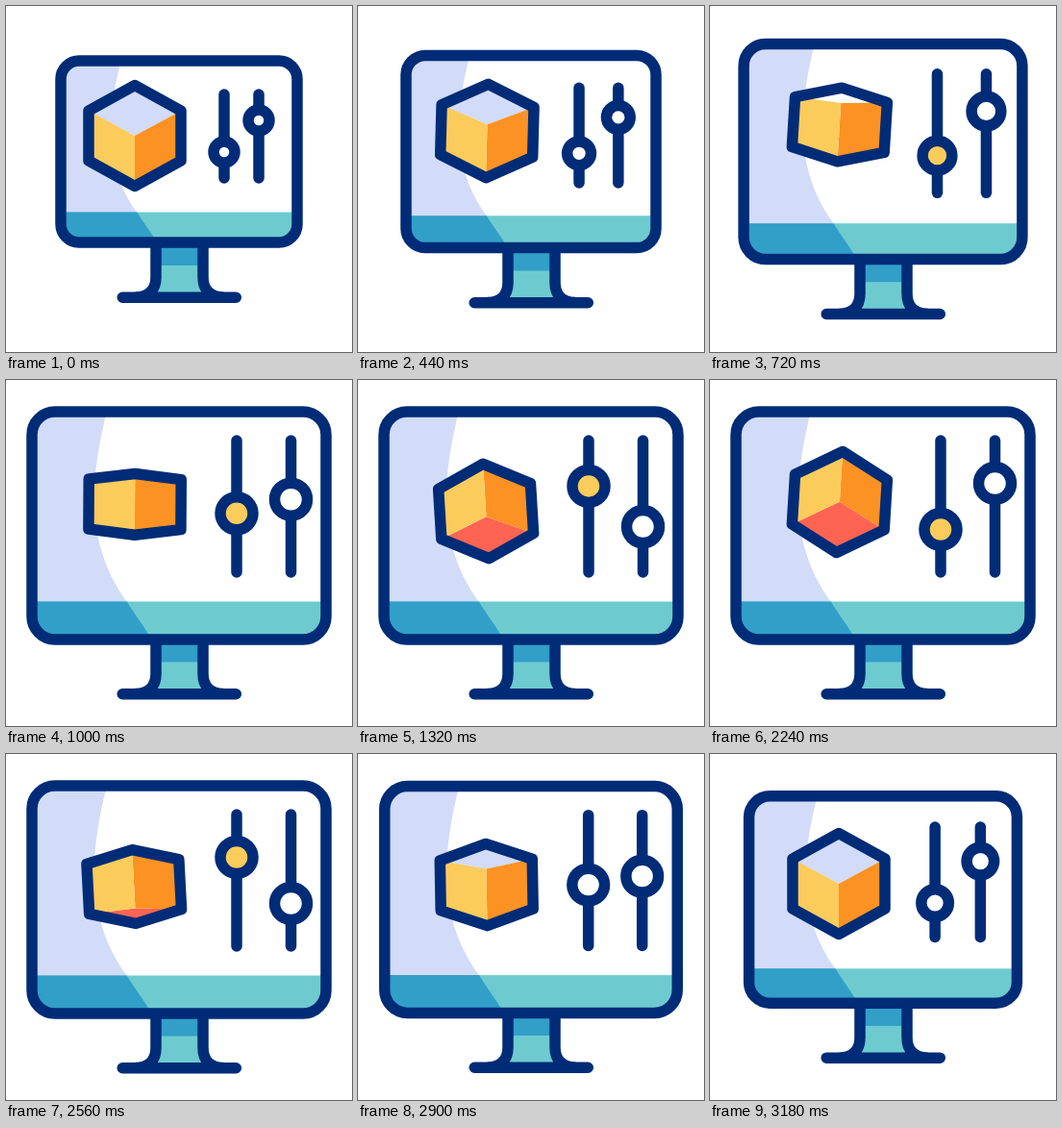
Write an HTML page with a canvas that moves like this. It is 360 by 360 pixels and loops after 3.2 s.

```html
<!DOCTYPE html>
<html lang="en">
<head>
<meta charset="utf-8">
<title>Monitor with cube and sliders</title>
<style>
  html, body { margin: 0; width: 100%; height: 100%; overflow: hidden; background: #fff; }
  canvas { display: block; width: 360px; height: 360px; }
</style>
</head>
<body>
<canvas id="stage"></canvas>
<script>
const LOOP = 3200, STEP = 20, SIZE = 360, LINE = 11.5;
const NAVY = '#002c77', TEAL = '#6dcbd0', BLUE = '#329fc9', LILAC = '#d2dbf8',
      YELLOW = '#fbcb5b', ORANGE = '#fc9223', RED = '#ff6452', WHITE = '#fff';

// Each track is a list of [time, value].
const tracks = {
  grow: [[205, 0], [600, .5], [720, .73], [990, 1], [2840, 1], [3220, .49], [3600, 0]],
  tilt: [[205, 33.5], [720, 15], [1320, -29], [1760, -35], [2160, -35], [2560, -15], [3120, 33.5]],
  roll: [[205, 0], [720, 3.5], [1320, -3.5], [1760, 0], [1800, 0], [2240, 3.5], [2560, -3], [3120, 0]],
  lift: [[205, 135], [720, 123.5], [1320, 136.5], [1760, 125.5], [2240, 127], [2560, 138], [3120, 135]],
  slide: [[680, 1], [1470, -1], [1475, -1], [2190, 1], [2610, -1], [3130, 1]]
};

const canvas = document.getElementById('stage');
const ctx = canvas.getContext('2d');
const ratio = window.devicePixelRatio || 1;
canvas.width = canvas.height = SIZE * ratio;

const mix = (a, b, p) => a + (b - a) * p;

// Slope at a key: flat at ends and turning points, harmonic mean elsewhere.
function slope(keys, i) {
  if (i === 0 || i === keys.length - 1) return 0;
  const [a, b, c] = [keys[i - 1], keys[i], keys[i + 1]];
  const before = (b[1] - a[1]) / (b[0] - a[0]);
  const after = (c[1] - b[1]) / (c[0] - b[0]);
  return before * after > 0 ? 2 * before * after / (before + after) : 0;
}

// Smooth interpolation that never overshoots its keys.
function valueAt(keys, t) {
  if (t <= keys[0][0]) return keys[0][1];
  const next = keys.findIndex(k => k[0] > t);
  if (next < 0) return keys[keys.length - 1][1];
  const [t0, v0] = keys[next - 1], [t1, v1] = keys[next];
  const span = t1 - t0, u = (t - t0) / span, u2 = u * u, u3 = u2 * u;
  return mix(v0, v1, 3 * u2 - 2 * u3)
    + span * slope(keys, next - 1) * (u3 - 2 * u2 + u)
    + span * slope(keys, next) * (u3 - u2);
}

function stroke(path) {
  ctx.strokeStyle = NAVY;
  ctx.lineWidth = LINE;
  ctx.lineCap = ctx.lineJoin = 'round';
  if (path) ctx.stroke(path);
  else ctx.stroke();
}

function polygon(points) {
  ctx.beginPath();
  points.forEach(([x, y]) => ctx.lineTo(x, y));
  ctx.closePath();
}

function face(color, ...points) {
  polygon(points);
  ctx.fillStyle = color;
  ctx.fill();
}

function rect(color, x, y, w, h) {
  ctx.fillStyle = color;
  ctx.fillRect(x, y, w, h);
}

const neck = new Path2D('M156 246V282C156 296 148 303 135 303H226C213 303 205 296 205 282V246Z');
const foot = new Path2D('M156 246V282C156 296 148 303 135 303M205 246V282C205 296 213 303 226 303M121.2 303.3H239.3');

function drawStand(grow) {
  ctx.save();
  ctx.translate(0, 23.5 * grow);
  ctx.fillStyle = TEAL;
  ctx.fill(neck);
  rect(BLUE, 156, 246, 49, 24);
  stroke(foot);
  ctx.restore();
}

function screenPath(grow) {
  const w = 123 + 30 * grow, h = 94.5 + 24 * grow;
  ctx.beginPath();
  ctx.roundRect(180 - w, 151.5 - h, 2 * w, 2 * h, mix(19, 24, grow));
}

const glare = new Path2D('M20 25H107C87 100 81 170 126 231C134 244 142 254 153 272H20Z');

function drawScreen(grow) {
  ctx.save();
  screenPath(grow);
  ctx.clip();
  ctx.translate(180, 151.5);
  ctx.scale((123 + 30 * grow) / 153, (94.5 + 24 * grow) / 118.5);
  ctx.translate(-180, -151.5);
  rect(WHITE, 0, 0, SIZE, SIZE);
  ctx.fillStyle = LILAC;
  ctx.fill(glare);
  rect(TEAL, 20, 230.5, 320, 50);
  ctx.beginPath();
  ctx.rect(20, 230.5, 320, 50);
  ctx.clip();
  ctx.fillStyle = BLUE;
  ctx.fill(glare);
  ctx.restore();
  screenPath(grow);
  stroke();
}

function drawSlider(x, grow, pos, color) {
  const top = mix(92, 63, grow), bottom = mix(179, 200, grow);
  ctx.beginPath();
  ctx.moveTo(x, top);
  ctx.lineTo(x, bottom);
  stroke();
  ctx.beginPath();
  ctx.arc(x, (top + bottom) / 2 + pos * mix(16.5, 26, grow), mix(11, 17, grow), 0, 2 * Math.PI);
  ctx.fillStyle = color;
  ctx.fill();
  stroke();
}

// The cap is the top face when tilted forward, the underside when tilted back.
function drawCube(tilt, roll, lift) {
  const rad = Math.PI / 180, w = 48, side = 26, dir = tilt < 0 ? -1 : 1;
  const far = side + w * Math.abs(Math.sin(tilt * rad));
  const edge = Math.min(63 * Math.cos(tilt * rad), 2 * far);
  const point = (x, y) => [x, y * dir];
  const capLeft = point(-w, -side), capRight = point(w, -side), capFar = point(0, -far);
  const left = point(-w, side), right = point(w, side);
  const near = point(0, far), corner = point(0, far - edge);
  const cap = dir < 0 ? RED : tilt > 20 ? LILAC : WHITE;
  ctx.save();
  ctx.translate(134 + roll / 4, lift);
  ctx.rotate(roll * rad);
  face(cap, capLeft, capFar, capRight, corner);
  face(ORANGE, corner, capRight, right, near);
  face(YELLOW, corner, capLeft, left, near);
  polygon([capLeft, capFar, capRight, right, near, left]);
  stroke();
  ctx.restore();
}

function draw(t) {
  const now = {};
  for (const name in tracks) now[name] = valueAt(tracks[name], t);
  const { grow, tilt, roll, lift, slide } = now;
  const lit = (t >= 480 && t < 1540) || (t >= 2000 && t < 2880);
  ctx.setTransform(ratio, 0, 0, ratio, 0, 0);
  rect(WHITE, 0, 0, SIZE, SIZE);
  drawStand(grow);
  drawScreen(grow);
  drawSlider(mix(227, 240, grow), grow, slide, lit ? YELLOW : WHITE);
  drawSlider(mix(263, 296.5, grow), grow, -slide, WHITE);
  drawCube(tilt, roll, lift);
}

const start = performance.now();
function tick() {
  const t = (performance.now() - start) % LOOP;
  draw(Math.floor(t / STEP) * STEP);
  requestAnimationFrame(tick);
}
tick();
</script>
</body>
</html>
```
